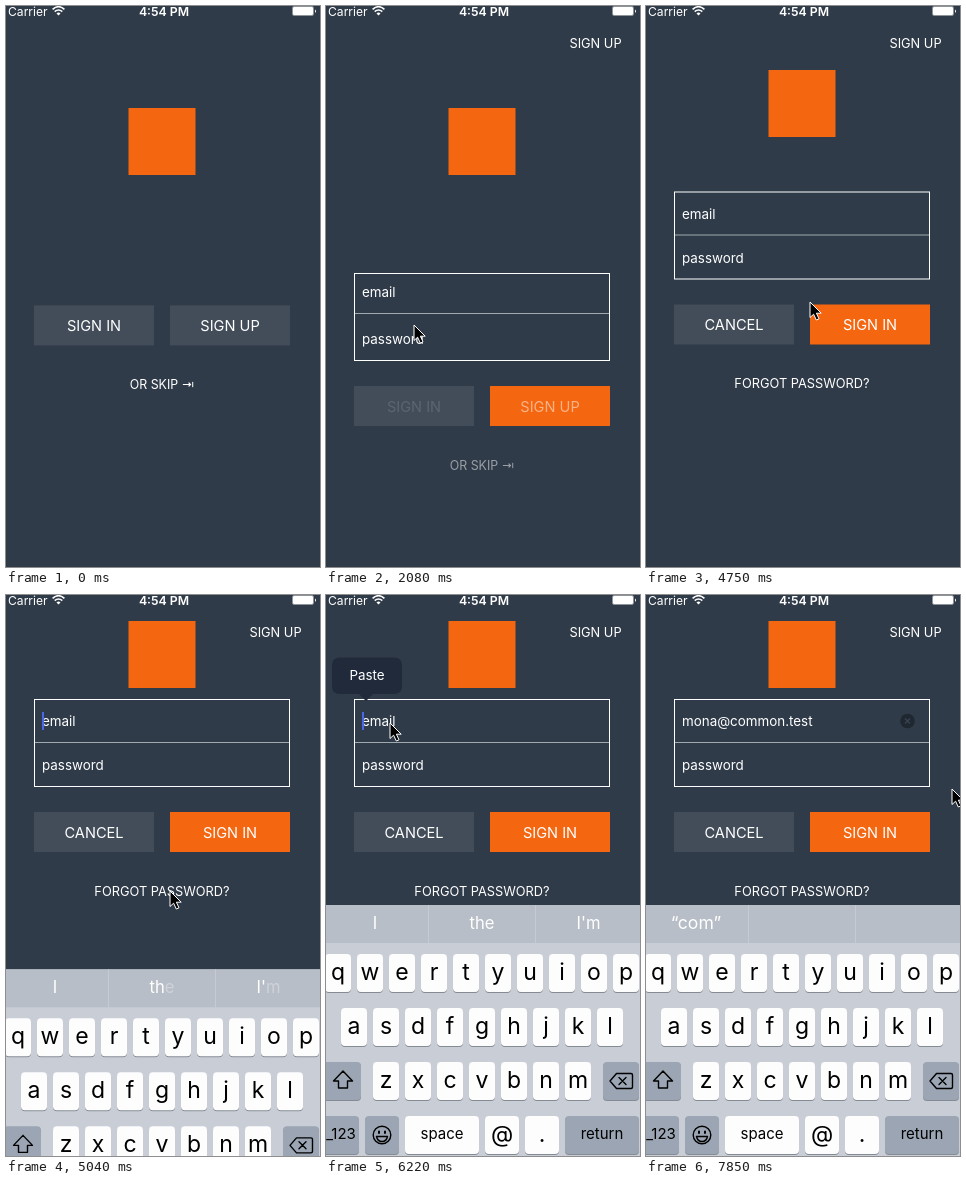
An HTML page that plays this animation: 314 by 561 pixels, repeating every 7990 ms.

```html
<!DOCTYPE html>
<html lang="en">
<head>
<meta charset="utf-8">
<title>Sign in</title>
<style>
  html, body { margin: 0; width: 100%; height: 100%; overflow: hidden; background: #303b49; }
  svg { display: block; width: 100%; height: 100%; }
  text { font-family: Inter, "DejaVu Sans", sans-serif; fill: #fff; white-space: pre; }
  .mid { text-anchor: middle; }
  .button { font-size: 14.6px; }
  .link { font-size: 12.8px; }
  .field { font-size: 13.4px; }
  .hint { font-size: 16.6px; }
  #keys text { fill: #000; }
  .icon { fill: none; stroke: #000; stroke-width: 1.4; stroke-linejoin: round; stroke-linecap: round; }
</style>
</head>
<body>
<svg viewBox="0 0 314 561">
  <rect width="314" height="561" fill="#303b49"/>

  <g id="status">
    <text x="2" y="9.6" font-size="12.1">Carrier</text>
    <g fill="none" stroke="#fff" stroke-width="1.6">
      <path d="M46.6 3.4Q52.5 -2 58.4 3.4M48.7 5.7Q52.5 2.3 56.3 5.7"/>
      <path d="M52.5 9.6L50.5 7.4Q52.5 5.8 54.5 7.4Z" fill="#fff" stroke="none"/>
    </g>
    <text class="mid" x="158" y="9.6" font-size="12.3" font-weight="600">4:54 PM</text>
    <rect x="286.5" y=".5" width="21" height="9" rx="1.5" fill="none" stroke="#fff" stroke-opacity=".45"/>
    <rect x="287" y="1" width="20" height="8" rx="1" fill="#fff"/>
    <path d="M309 3.5q2 1.5 0 3.5z" fill="#fff"/>
  </g>

  <rect id="logo" x="122.5" width="67" height="67" fill="#f4660f"/>
  <text id="topLink" class="link mid" x="269.5" y="41.6">SIGN UP</text>

  <g id="panel">
    <g id="form">
      <rect x="28.5" y="267.5" width="255" height="87" fill="none" stroke="#fff"/>
      <g id="emailRow">
        <path d="M29 310.5H283" stroke="#a0a9ae"/>
        <text id="email" class="field" x="36" y="294"></text>
      </g>
      <text class="field" x="36" y="338">password</text>
      <g id="clear">
        <circle cx="261.5" cy="289" r="7.3" fill="#1f2731"/>
        <path d="M259 286.5l5 5m0-5l-5 5" stroke="#3a4553" stroke-width="1.2"/>
      </g>
      <rect id="caret" y="280" width="2" height="18" fill="#4a67e8"/>
    </g>
    <g id="actions">
      <rect x="28" y="380" width="120" height="40" fill="#434d59"/>
      <rect id="rightButton" x="164" y="380" width="120" height="40"/>
      <text id="oldLeft" class="button mid" x="88" y="405.5">SIGN IN</text>
      <g id="oldRest">
        <text class="button mid" x="224" y="405.5">SIGN UP</text>
        <text class="mid" x="156" y="463.6" font-size="12.4">OR SKIP ⇥</text>
      </g>
      <g id="newLabels">
        <text class="button mid" x="88" y="405.5">CANCEL</text>
        <text class="button mid" x="224" y="405.5">SIGN IN</text>
        <text class="link mid" x="156" y="463.6">FORGOT PASSWORD?</text>
      </g>
    </g>
  </g>

  <g id="keyboard">
    <rect width="314" height="260" fill="#c9ced6"/>
    <rect width="314" height="38" fill="#b8bec7"/>
    <path d="M102.5 0V38M209.5 0V38" stroke="#c6cbd2"/>
    <g id="hints">
      <text id="firstHint" class="hint mid" x="49" y="24">I</text>
      <text class="hint mid" x="156" y="24">th<tspan class="tail">e</tspan></text>
      <text class="hint mid" x="262.5" y="24">I'<tspan class="tail">m</tspan></text>
    </g>
    <text id="quoted" class="mid" x="50" y="24" font-size="17.6">“com”</text>
    <g id="keys"></g>
    <g class="icon">
      <path d="M17 166l9.5 10h-5v7h-9v-7h-5z"/>
      <path d="M284 176l6.5-7.5h14.5q1.5 0 1.5 1.5v12q0 1.5-1.5 1.5h-14.5zM293 172.5l7 7m0-7l-7 7"/>
      <circle cx="56" cy="230" r="8.8"/>
      <path d="M53 226.5v1.5M59 226.5v1.5" stroke-width="2"/>
      <path d="M50.5 231.5h11q-1 5-5.5 5t-5.5-5z"/>
    </g>
  </g>

  <g id="popup">
    <path d="M14 62.5H68q8 0 8 8V91q0 8-8 8H47l-7 7-7-7H14q-8 0-8-8V70.5q0-8 8-8z" fill="#202a3b"/>
    <text class="field mid" x="41" y="85">Paste</text>
  </g>

  <path id="pointer" d="M0 0V15.5L3.6 12.2 6.3 18 9 16.8 6.4 11.2H11.2Z" stroke="#fff"/>
</svg>

<script>
const LOOP = 7990, STEPS = 54;
const el = Object.fromEntries([...document.querySelectorAll('[id]')].map(e => [e.id, e]));
const tails = document.querySelectorAll('.tail');

// Keyboard: each row runs left to right with a fixed gap
const GAP = 6, KEY_WIDTH = 26;
const DARK_KEYS = ['shift', 'delete', '_123', 'emoji', 'return'];
const ICON_KEYS = ['shift', 'delete', 'emoji'];

function drawKey(name, x, y, width) {
  const fill = DARK_KEYS.includes(name) ? '#9ba5b3' : '#fdfdfe';
  const label = ICON_KEYS.includes(name) ? '' : name;
  const size = label.length > 1 ? 15 : 23;
  const rect = (top, color) =>
    `<rect x="${x}" y="${top}" width="${width}" height="38" rx="4" fill="${color}"/>`;
  el.keys.innerHTML += rect(y + 1, '#858b94') + rect(y, fill) +
    `<text class="mid" x="${x + width / 2}" y="${y + 18 + size / 3}" font-size="${size}">${label}</text>`;
}

function drawRow(names, x, y, widthOf = () => KEY_WIDTH) {
  for (const name of names) {
    drawKey(name, x, y, widthOf(name));
    x += widthOf(name) + GAP;
  }
}

drawRow('qwertyuiop', -1, 49);
drawRow('asdfghjkl', 15, 103);
drawRow('zxcvbnm', 47, 157);
drawKey('shift', -3, 157, 38);
drawKey('delete', 277, 157, 36);
drawRow(['_123', 'emoji', 'space', '@', '.', 'return'], -3, 211,
  name => name === '_123' ? 36 : name.length > 4 && name !== 'emoji' ? 74 : 34);

// Motion, in steps of the loop
const progress = (step, from, to) => Math.min(1, Math.max(0, (step - from) / (to - from)));
const easeOut = p => 1 - (1 - p) ** 3;
const easeInOut = p => p * p * (3 - 2 * p);

const POINTER_START = { x: 282, y: 253 };
const POINTER_MOVES = [
  { from: 3, to: 9, x: 95, y: 326 },
  { from: 13, to: 14, x: 88, y: 319 },
  { from: 18, to: 21, x: 208, y: 309 },
  { from: 23, to: 27, x: 176, y: 413 },
  { from: 27, to: 31, x: 164, y: 296 },
  { from: 34, to: 36, x: 132, y: 159 },
  { from: 36, to: 38, x: 64, y: 128 },
  { from: 43, to: 45, x: 45, y: 84 },
  { from: 46, to: 47, x: 85, y: 98 },
  { from: 47, to: 53, x: 306, y: 194 },
];

function pointerAt(step) {
  return POINTER_MOVES.reduce((pos, move) => {
    const p = progress(step, move.from, move.to);
    return { x: pos.x + (move.x - pos.x) * p, y: pos.y + (move.y - pos.y) * p };
  }, POINTER_START);
}

const shift = (e, x, y) => e.setAttribute('transform', `translate(${x} ${y})`);
const show = (e, opacity) => e.setAttribute('opacity', Number(opacity));

function draw(step) {
  const signingIn = step >= 14, pasted = step >= 46;
  const oldFade = 1 - progress(step, 13, 15);
  const lift = easeInOut(progress(step, 30, 34));
  const keyboardUp = easeOut(progress(step, 32.45, 36.7));
  const hintsLeft = 1 - progress(step, 46, 48);
  const pointer = pointerAt(step);

  el.logo.setAttribute('y', 102 - 76 * lift);
  shift(el.panel, 0, -163 * lift);
  shift(el.actions, 0, signingIn ? 0 : -80.6);
  shift(el.emailRow, 0, -3 * (1 - progress(step, 14, 16)));
  show(el.topLink, signingIn);
  show(el.form, signingIn);
  show(el.oldLeft, oldFade ** 3);
  show(el.oldRest, oldFade);
  show(el.newLabels, progress(step, 14, 17));
  el.rightButton.setAttribute('fill', signingIn ? '#f4660f' : '#434d59');

  el.email.textContent = pasted ? 'mona@common.test' : 'email';
  show(el.clear, pasted);
  show(el.caret, step >= 33 && step < 51);
  el.caret.setAttribute('x', pasted ? 170 : 36);

  shift(el.keyboard, 0, 561 - 251 * keyboardUp);
  show(el.hints, hintsLeft > 0);
  show(el.firstHint, hintsLeft ** 2);
  tails.forEach(t => t.setAttribute('fill-opacity', progress(step, 33, 36) * hintsLeft));
  show(el.quoted, step >= 49);

  show(el.popup, step >= 42 && step < 48);
  show(el.pointer, step >= 3);
  shift(el.pointer, pointer.x, pointer.y);
}

const start = performance.now();
function frame() {
  const time = (performance.now() - start) % LOOP;
  draw(Math.min(STEPS - 1, Math.floor(time / LOOP * STEPS + .1)));
  requestAnimationFrame(frame);
}
frame();
</script>
</body>
</html>
```
